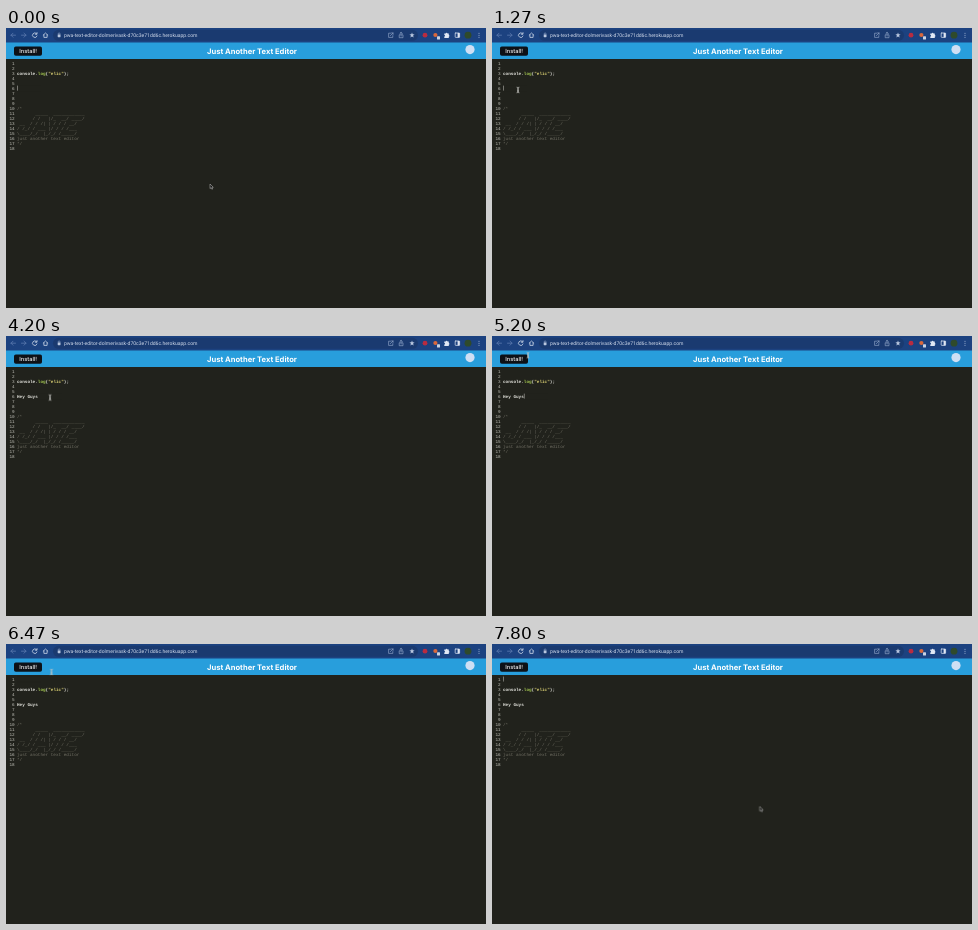
Write an HTML page that moves like this. It is 480 px wide and 280 px high and loops after 8000 ms.

```html
<!DOCTYPE html>
<html lang="en">
<head>
<meta charset="utf-8">
<title>Just Another Text Editor</title>
<style>
  html, body { margin: 0; width: 100%; height: 100%; overflow: hidden; background: #21221c; }
  svg { display: block; width: 100vw; height: 100vh; text-rendering: geometricPrecision; }

  .url { font: 5.05px Roboto, sans-serif; fill: #d3dcec; }
  .title { font: 700 7.6px Inter, sans-serif; fill: #fff; text-anchor: middle; }
  .install { font: 500 5.7px Inter, sans-serif; fill: #f0f0f0; text-anchor: middle; }
  .code text { font: 4.333px "Liberation Mono", monospace; white-space: pre; fill: #e2e2dc; }
  .code .num { fill: #c4c4bc; text-anchor: end; }
  .code .note { fill: #727065; }
  .code .strong { font-weight: 700; }
  .fn { fill: #a3c650; }
  .str { fill: #d8cd72; }

  .icon { fill: none; stroke: #d5deed; stroke-width: .75; stroke-linecap: round; stroke-linejoin: round; }
  .icon .dim { stroke: #5f7db0; }
  .icon .soft { stroke: #9db0d0; stroke-width: .6; }
  .solid { fill: #e0e7f3; }
  .solid .soft { fill: #b9c7df; }

  .title, .logo, .typing, .caret, .mouse, .arrow, .beam {
    animation: 8s step-end infinite;
  }
  .title { animation-name: shift; }
  .logo { animation-name: reload; }
  .typing { animation-name: type; }
  .caret { animation-name: blink; }
  .arrow { animation-name: arrow; }
  .beam { animation-name: beam; }
  .mouse { animation: move 8s ease-in-out infinite, hide 8s step-end infinite; }

  @keyframes shift {
    0%, 74.2% { transform: none; }
    70.8% { transform: translateX(16px); }
  }
  @keyframes reload {
    0%, 74.2% { opacity: 1; }
    70.8% { opacity: 0; }
  }
  /* one character is 2.6px wide; the page reload sends the caret to line 1 */
  @keyframes type {
    0% { transform: none; }
    25% { transform: translateX(2.6px); }
    29.1% { transform: translateX(5.2px); }
    30.4% { transform: translateX(7.8px); }
    31.6% { transform: translateX(10.4px); }
    40% { transform: translateX(13px); }
    42.5% { transform: translateX(15.6px); }
    44.1% { transform: translateX(18.2px); }
    45.85% { transform: translateX(20.8px); }
    70.8%, 100% { transform: translateY(-25.15px); }
  }
  @keyframes blink {
    0%, 10%, 25%, 40%, 59.1%, 70.8%, 84.1%, 97.35%, 100% { opacity: 1; }
    3.375%, 23.375%, 38.25%, 52.4%, 65.75%, 77.5%, 90.75% { opacity: 0; }
  }
  @keyframes move {
    0%, .875% { transform: translate(204px, 156px); }
    5%, 7.5% { transform: translate(394px, 70px); }
    15.8%, 50% { transform: translate(26px, 62px); }
    52.5% { transform: translate(44px, 61.5px); }
    55%, 58.4% { transform: translate(58px, 63px); }
    68.4%, 74.5% { transform: translate(29px, 5.5px); }
    80%, 80.9% { transform: translate(45.5px, 28px); }
    84.1%, 85.9% { transform: translate(91px, 77px); }
    92.5%, 95% { transform: translate(298px, 92px); }
    97.5%, 100% { transform: translate(267.7px, 162.5px); }
  }
  @keyframes hide {
    0%, 50% { opacity: 1; }
    25% { opacity: 0; }
  }
  @keyframes arrow {
    0%, 66%, 96.2%, 100% { opacity: 1; }
    2.6%, 77.5% { opacity: 0; }
  }
  @keyframes beam {
    0%, 66%, 96.2%, 100% { opacity: 0; }
    2.6%, 77.5% { opacity: 1; }
  }
</style>
</head>
<body>
<svg viewBox="0 0 480 280">
  <rect width="480" height="280" fill="#21221c"/>

  <!-- browser bar -->
  <rect width="480" height="15" fill="#1c4280"/>
  <rect x="47" y="1.8" width="365" height="11" rx="5.5" fill="#1a3a70"/>
  <g class="icon">
    <path class="dim" d="M9.5 7.2H5M7 5.2l-2 2 2 2M15.5 7.2H20M18 5.2l2 2-2 2"/>
    <path d="M30.6 5.7A2.3 2.3 0 1 0 31 8M31 4.6V6.2H29.3"/>
    <path d="M37.2 7.2l2.3-2.2 2.3 2.2M37.9 6.8v2.6h3.2V6.8"/>
    <path class="soft" d="M384.6 5.2H382.6V9.4H386.8V7.6M384.4 7.6L387 5M385.6 4.9H387.1V6.4"/>
    <path class="soft" d="M394.3 6.8H393.2V9.7H397V6.8H395.9M395.1 8V4.4M393.9 5.5l1.2-1.2 1.2 1.2"/>
    <rect x="449.2" y="5" width="4.4" height="4.4" rx=".5"/>
    <path class="soft" d="M52.2 6.5v-.7a.9.9 0 0 1 1.8 0v.7"/>
  </g>
  <g class="solid">
    <rect class="soft" x="51.7" y="6.6" width="2.8" height="2.6" rx=".4"/>
    <path class="soft" d="M406 4.5l.7 1.8 1.9.1-1.5 1.2.5 1.9-1.6-1-1.6 1 .5-1.9-1.5-1.2 1.9-.1z"/>
    <path d="M438.3 5.6h1.4a.9.9 0 0 1 1.8 0h1.3v1.5a.9.9 0 0 1 0 1.7v1.2h-4.5V8.5a.8.8 0 0 0 0-1.6z"/>
    <rect x="451.6" y="5" width="2" height="4.4"/>
    <circle class="soft" cx="473" cy="5.2" r=".5"/>
    <circle class="soft" cx="473" cy="7.2" r=".5"/>
    <circle class="soft" cx="473" cy="9.2" r=".5"/>
  </g>
  <circle cx="419" cy="7.2" r="2.4" fill="#b82c40"/>
  <circle cx="429.4" cy="7" r="2.1" fill="#d9683c"/>
  <rect x="431" y="8.2" width="3" height="3.2" rx=".5" fill="#c9d3e4"/>
  <circle cx="462" cy="7.2" r="3.4" fill="#2f4a2b"/>
  <text x="57.9" y="9" class="url">pwa-text-editor-dolmerivask-d70c3e71dd6c.herokuapp.com</text>

  <!-- page header -->
  <rect y="14.5" width="480" height="16.5" fill="#289edc"/>
  <rect x="8" y="18.5" width="28" height="9.3" rx="1.8" fill="#0d1116"/>
  <text x="22.2" y="25.1" class="install">Install!</text>
  <text x="246" y="25.8" class="title">Just Another Text Editor</text>
  <circle class="logo" cx="464" cy="21.6" r="4.6" fill="#cfdff4"/>

  <g class="code" id="code"></g>

  <!-- the backdrop hides the characters not typed yet -->
  <g class="typing">
    <rect x="11" y="57.4" width="24" height="5.8" fill="#21221c"/>
    <rect class="caret" x="11.1" y="57.6" width=".6" height="5" fill="#b4b4ae"/>
  </g>

  <g class="mouse">
    <path class="arrow" d="M0 0V4.6L1.1 3.6 1.9 5.3 2.7 4.9 1.9 3.3H3.3Z" fill="#111" stroke="#c4c4c2" stroke-width=".5"/>
    <path class="beam" d="M-1.4-2.8Q0-2.8 0-2V2Q0 2.8-1.4 2.8M1.4-2.8Q0-2.8 0-2V2Q0 2.8 1.4 2.8M-.7 1H.7" fill="none" stroke="#c9c9c4" stroke-width=".7"/>
  </g>
</svg>
<script>
  const note = (s) => ["note", s];
  const lines = {
    3: ["strong", 'console.<tspan class="fn">log</tspan>(<tspan class="str">"elic"</tspan>);'],
    6: ["strong", "Hey Guys"],
    10: note("/*"),
    11: note("       _____  ____________"),
    12: note("      / /   |/_  __/ ____/"),
    13: note(" __  / / /| | / / / __/"),
    14: note("/ /_/ / ___ |/ / / /___"),
    15: note("\\____/_/  |_/_/ /_____/"),
    16: note("just another text editor"),
    17: note("*/"),
  };
  let rows = "";
  for (let n = 1; n <= 18; n++) {
    const y = 31.6 + 5.03 * n;
    rows += `<text class="num" x="8.6" y="${y}">${n}</text>`;
    if (lines[n]) rows += `<text class="${lines[n][0]}" x="11" y="${y}">${lines[n][1]}</text>`;
  }
  document.getElementById("code").innerHTML = rows;
</script>
</body>
</html>
```
